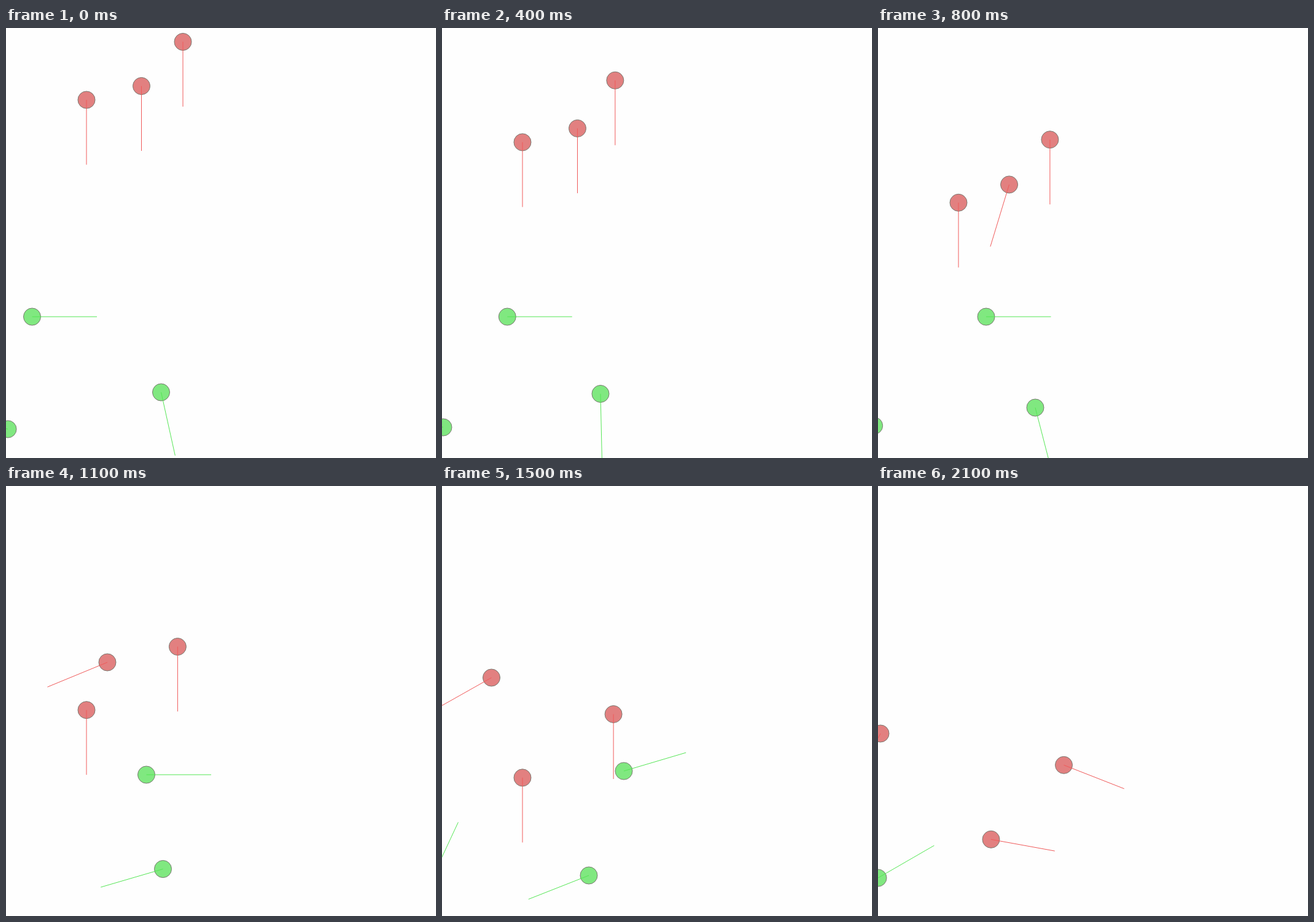
Recreate the animation shown at these times as an HTML page with a canvas. Size 700x700 px, loop 2200 ms.

```html
<!DOCTYPE html>
<html lang="en">
<head>
<meta charset="utf-8">
<title>Wandering agents</title>
<style>
  html, body { margin: 0; width: 100%; height: 100%; overflow: hidden; background: #fefefe; }
  canvas { display: block; }
</style>
</head>
<body>
<canvas id="stage" width="700" height="700"></canvas>
<script>
const LOOP = 2200, STEP = 100, RADIUS = 14, SIGHT = 105.5, TAGGED = 20;
const RED = { fill: '#e28080', line: '#f05a5a', speed: 28, drag: 0.75 };
const GREEN = { fill: '#80e880', line: '#55e655', speed: 17.5, drag: 0.46 };
const rad = deg => deg * Math.PI / 180;

// An agent first cruises: drag eases it from its launch speed to full speed,
// which leaves it `slip` behind. Then it turns through its bends: step, x, y, heading.
function agent(team, [x, y, heading], { cruise = 0, slip = [0, 0], out = Infinity }, ...bends) {
  const keys = [];
  for (let n = 0; n <= cruise; n++) {
    const eased = 1 - team.drag ** n, run = team.speed * n;
    keys.push([
      n,
      x + run * Math.cos(rad(heading)) - slip[0] * eased,
      y + run * Math.sin(rad(heading)) - slip[1] * eased,
      heading
    ]);
  }
  return { team, out, keys: keys.concat(bends) };
}

const agents = [
  agent(RED, [131, 117, 90], { cruise: 15, slip: [0, 63] },
    [17, 138.5, 523, 71], [21, 184, 575.3, 10.3]),
  agent(RED, [220.5, 94.5, 90], { cruise: 7, slip: [0, 63] },
    [11, 165, 287, 157.6], [15, 80.5, 312, 150.6], [17, 46, 333.5, 138.5], [21, 4, 403, 118]),
  agent(RED, [288, 22.5, 90], { cruise: 15, slip: [9, 72] },
    [17, 267.5, 415.5, 115], [21, 302.5, 454.3, 21.4]),
  agent(GREEN, [42.5, 470, 0], { cruise: 11, slip: [6.5, 0], out: TAGGED },
    [15, 296, 464, -16.5], [17, 330, 455.7, -12], [20, 382, 453, 0]),
  agent(GREEN, [252.5, 593, 77.5], { out: TAGGED },
    [4, 258, 595.5, 88.7], [8, 256, 618, 75.5], [11, 255.5, 623.5, 163.7],
    [15, 239, 634, 158.5], [17, 237.5, 627.5, 260.4]),
  agent(GREEN, [3, 653, 195], {},
    [4, 2, 650, 195], [15, -18.2, 643, 295], [21, 0, 638, -30])
];

// Slope at key i, weighted towards the nearer neighbour
function slope(keys, i, c) {
  const rate = j => (keys[j + 1][c] - keys[j][c]) / (keys[j + 1][0] - keys[j][0]);
  if (i === 0) return rate(0);
  if (i === keys.length - 1) return rate(i - 1);
  const w = (keys[i][0] - keys[i - 1][0]) / (keys[i + 1][0] - keys[i - 1][0]);
  return rate(i - 1) * (1 - w) + rate(i) * w;
}

function pose(keys, step) {
  const last = keys.length - 1;
  const now = Math.min(step, keys[last][0]);
  let i = 0;
  while (i < last - 1 && now >= keys[i + 1][0]) i++;
  const a = keys[i], b = keys[i + 1], span = b[0] - a[0];
  const u = (now - a[0]) / span, v = 1 - u;
  const curve = c =>
    a[c] * v * v * (1 + 2 * u) + b[c] * u * u * (3 - 2 * u) +
    span * u * v * (slope(keys, i, c) * v - slope(keys, i + 1, c) * u);
  return { x: curve(1), y: curve(2), angle: rad(a[3] * v + b[3] * u) };
}

const ctx = document.getElementById('stage').getContext('2d');

function drawAgent({ x, y, angle }, team) {
  ctx.beginPath();
  ctx.arc(x, y, RADIUS, 0, 2 * Math.PI);
  ctx.fillStyle = team.fill;
  ctx.fill();
  ctx.strokeStyle = '#7a7a72';
  ctx.stroke();
  ctx.beginPath();
  ctx.moveTo(x, y);
  ctx.lineTo(x + SIGHT * Math.cos(angle), y + SIGHT * Math.sin(angle));
  ctx.strokeStyle = team.line;
  ctx.stroke();
}

function draw(ms) {
  const step = Math.floor((ms % LOOP) / STEP);
  ctx.fillStyle = '#fefefe';
  ctx.fillRect(0, 0, 700, 700);
  for (const { team, keys, out } of agents) {
    if (step <= out) drawAgent(pose(keys, step), team);
  }
}

const start = performance.now();
function tick() {
  draw(performance.now() - start);
  requestAnimationFrame(tick);
}
tick();
</script>
</body>
</html>
```
